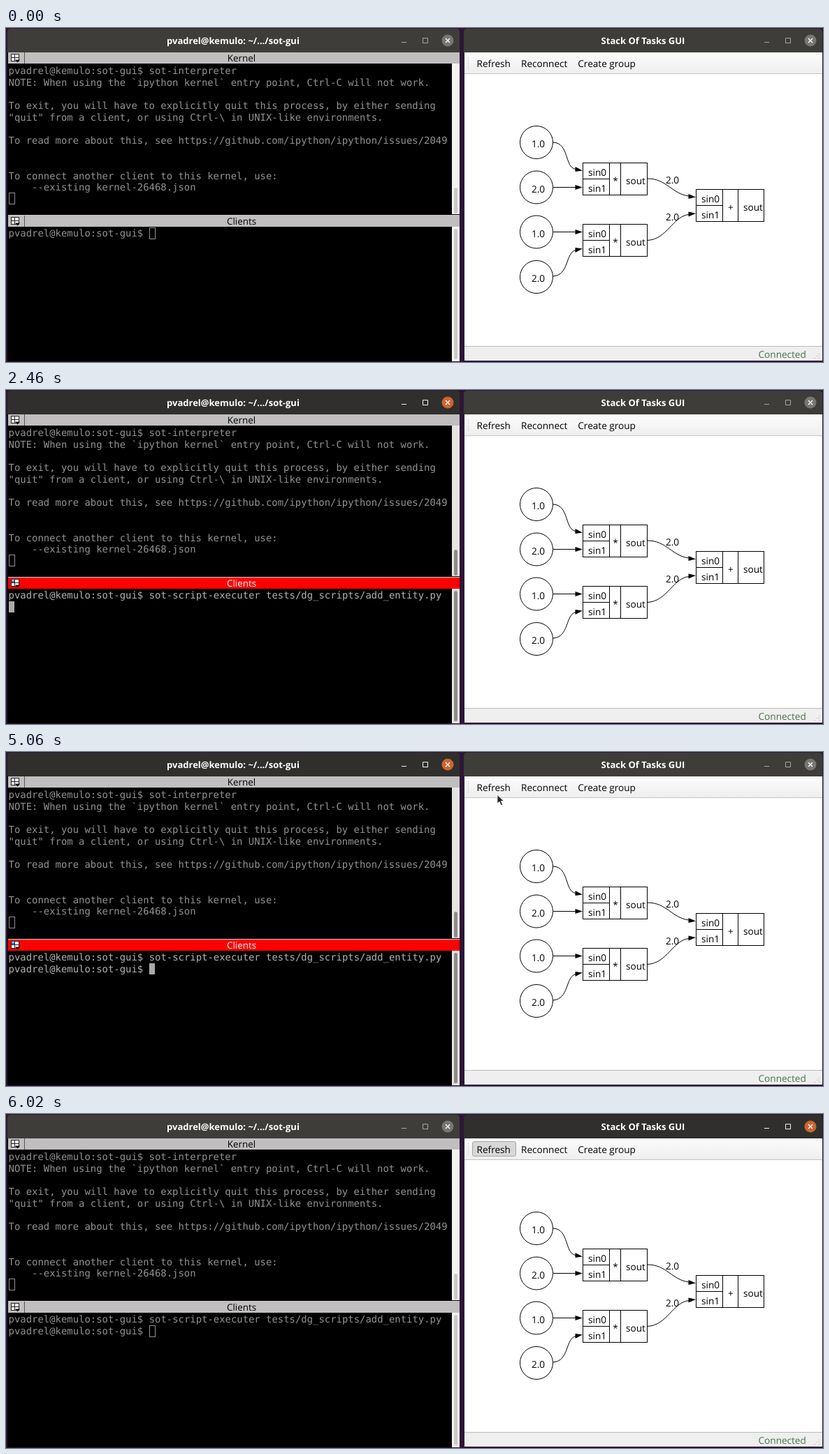
These frames come from a looping animation (1169 px wide and 479 px high, 8000 ms). An HTML page:

```html
<!DOCTYPE html>
<html lang="en">
<head>
<meta charset="utf-8">
<title>Stack Of Tasks GUI</title>
<style>
  html, body { margin: 0; width: 100%; height: 100%; overflow: hidden; background: #2d1636; }
  svg { display: block; width: 1169px; height: 479px; }
  text { white-space: pre; text-rendering: geometricPrecision; font: 500 13.6px "Open Sans", "Noto Sans", sans-serif; }
  .mid { text-anchor: middle; }
  .title { font-weight: 700; font-size: 13px; fill: #fff; text-anchor: middle; }
  .pane { font-size: 13.4px; text-anchor: middle; }
  .term text { font: 13.92px "DejaVu Sans Mono", monospace; fill: #929292; }
  .line { fill: none; stroke: #000; }
  .hollow { fill: none; stroke: #929292; }
  rect, .crisp { shape-rendering: crispEdges; }

  .win { --bar: #3e3d39; --glyph: #a9a8a5; --close: #777672; --track: #f4f3f2; --thumb: #cbc9c7; }
  .win.active { --bar: #302f2e; --glyph: #f4f4f2; --close: #cb6530; --track: #e6e4e2; --thumb: #8d8c8b; }
  .bar { fill: var(--bar); }
  .glyph { fill: none; stroke: var(--glyph); }
  .close { fill: var(--close); }
  .track { fill: var(--track); }
  .thumb { fill: var(--thumb); shape-rendering: auto; }

  .strip { fill: #c0bebf; }
  .active .clients .strip { fill: #f00; }
  .active .clients .pane { fill: #fff; }
  .active .clients .divider { stroke: #d80000; }
  .active .clients .chip { fill: #3f7fd0; }
  .active .clients .term text { fill: #b2b2b2; }
</style>
</head>
<body>
<svg id="stage" viewBox="0 0 1169 479" xmlns="http://www.w3.org/2000/svg"></svg>
<script>
const LOOP = 8000;
const CELL = { w: 8.378, h: 16.75 };
const PROMPT = 'pvadrel@kemulo:sot-gui$ ';
const COMMAND = 'sot-script-executer tests/dg_scripts/add_entity.py';

const rect = (x, y, w, h, attrs) => `<rect x="${x}" y="${y}" width="${w}" height="${h}" ${attrs}/>`;
const text = (x, y, value, cls = '', id = '') => `<text x="${x}" y="${y}" class="${cls}" id="${id}">${value}</text>`;
const path = (d, cls = 'line', attrs = '') => `<path d="${d}" class="${cls}" ${attrs}/>`;
const rows = (top, lines) => lines.map((s, i) => s && text(3.6, top + 13 + i * CELL.h, s)).join('');

function titleBar(x, width, center, closeX, label) {
  return path(`M${x} 35V6q0-5 5-5H${x + width - 5}q5 0 5 5V35z`, 'bar')
    + text(center, 23, label, 'title')
    + path(`M${closeX - 66} 20.5h7M${closeX - 35.5} 14.5h7v7h-7z`, 'glyph')
    + `<circle cx="${closeX}" cy="18" r="8.5" class="close"/>`
    + path(`M${closeX - 3} 15l6 6m0-6l-6 6`, 'line', 'style="stroke:#fff" stroke-width="1.4"');
}

function paneHeader(y, h, label) {
  const mid = y + h - 7.5;
  return rect(3, y, 646, h, 'class="strip"')
    + path(`M26.5 ${y}v${h}`, 'line divider crisp', 'style="stroke-opacity:.55" stroke="#777"')
    + rect(7, mid - 6, 11, 10, 'fill="#fff" stroke="#222"')
    + rect(8, mid - 5, 4, 4, 'class="chip" fill="#ddd"')
    + path(`M12.5 ${mid - 6}v10M7 ${mid - 1}h11`, 'line crisp', 'style="stroke:#222"')
    + path(`M13 ${mid + 2}h7l-3.5 4z`, '', 'fill="#111"')
    + text(337, mid + 4.6, label, 'pane');
}

function scrollbar(y, h, thumbY, thumbH) {
  return rect(638, y, 11, h, 'class="track"')
    + rect(641, thumbY, 5, thumbH, 'rx="2.5" class="thumb"');
}

function terminalWindow() {
  const kernelText = [
    PROMPT + 'sot-interpreter',
    'NOTE: When using the `ipython kernel` entry point, Ctrl-C will not work.',
    '',
    'To exit, you will have to explicitly quit this process, by either sending',
    '"quit" from a client, or using Ctrl-\\ in UNIX-like environments.',
    '',
    'To read more about this, see https://github.com/ipython/ipython/issues/2049',
    '', '',
    'To connect another client to this kernel, use:',
    '    --existing kernel-26468.json'
  ];
  return `<g id="terminal" class="win">`
    + rect(2, 30, 647, 448, 'fill="#000"')
    + titleBar(2, 647, 325, 632, 'pvadrel@kemulo: ~/.../sot-gui')
    + `<g class="kernel">${paneHeader(35, 16, 'Kernel')}${scrollbar(51, 216, 229, 37)}`
    + `<g class="term">${rows(52.8, kernelText)}</g>${rect(4.5, 236.5, 8, 16, 'class="hollow"')}</g>`
    + rect(3, 268, 646, 1, 'fill="#d0cecd"')
    + `<g class="clients">${paneHeader(269, 16, 'Clients')}${scrollbar(285, 193, 288, 187)}`
    + `<g class="term">${rows(286.2, [PROMPT])}`
    + text(3.6 + 24 * CELL.w, 299.2, COMMAND, '', 'command')
    + text(3.6, 315.95, PROMPT, '', 'nextPrompt')
    + `</g>${rect(0, 0, 8, 16, 'id="cursor"')}</g></g>`;
}

function edge(d, x, y, slope = 0) {
  return path(d) + path(`M${x} ${y}l-10.5 ${-3.5 - slope}v7z`, '', 'fill="#000"');
}

function block(x, y, w, opLeft, opRight, symbol) {
  return rect(x + .5, y + .5, w, 46, 'class="line"')
    + path(`M${x} ${y + 23.5}h${opLeft}M${x + opLeft + .5} ${y}v46M${x + opRight + .5} ${y}v46`, 'line crisp')
    + text(x + 8, y + 19.3, 'sin0') + text(x + 8, y + 42.3, 'sin1')
    + text(x + (opLeft + opRight) / 2 + 1, y + 30.5, symbol, 'mid')
    + text(x + opRight + 8, y + 30.5, 'sout');
}

function graph() {
  const inputs = [[164, '1.0'], [228.5, '2.0'], [292.5, '1.0'], [357, '2.0']];
  return inputs.map(([y, v]) =>
      `<circle cx="759" cy="${y}" r="23.5" class="line"/>` + text(761.5, y + 7, v, 'mid')).join('')
    + block(825, 193, 92, 38, 54, '*')
    + block(825, 281, 92, 38, 54, '*')
    + block(987, 231, 97, 38, 60, '+')
    + edge('M783 164C806 165 799 200 815 202.5', 825, 204.5, 2)
    + edge('M783 228.5H815', 825, 228.5)
    + edge('M783 292.5H815', 825, 292.5)
    + edge('M783 356C806 354 800 323 815 318.5', 825, 316.5, -2)
    + edge('M918 216C945 216 953 238 977 241', 987, 242.5, 1)
    + edge('M918 304.5C946 303 954 270 977 267.5', 987, 266, -1)
    + text(953.5, 223, '2.0', 'mid') + text(953.5, 276, '2.0', 'mid');
}

function guiWindow() {
  const dots = Array.from({ length: 6 }, (_, i) => rect(661, 42 + i * 3, 1, 1, 'fill="#aaa"')).join('');
  const grip = [0, 1, 2].map(i => rect(1157 + i * 3, 473 - i * 3, 1, 1, 'fill="#aaa"')
    + rect(1163, 473 - i * 3, 1, 1, 'fill="#aaa"')).join('');
  return `<g id="gui" class="win">`
    + rect(656, 30, 512, 447, 'fill="#fff"')
    + titleBar(655, 513, 911.5, 1151, 'Stack Of Tasks GUI')
    + rect(656, 35, 512, 30, 'fill="url(#toolbar)"')
    + rect(656, 65, 512, 1, 'fill="#c4c4c4"') + dots
    + rect(667.5, 39.5, 62, 21, 'rx="2.5" id="button" style="shape-rendering:auto"')
    + text(673.5, 56, 'Refresh') + text(737, 56, 'Reconnect') + text(818.3, 56, 'Create group')
    + graph()
    + rect(656, 456, 512, 21, 'fill="#efefef"') + rect(656, 456, 512, 1, 'fill="#b9b9b9"')
    + `<g fill="#457345">${text(1076.5, 472.5, 'Connected')}</g>` + grip + `</g>`;
}

const BEAM = 'M-3-7.5h2l1 1 1-1h2M0-6.5v13M-3 7.5h2l1-1 1 1h2';
const stage = document.getElementById('stage');
stage.innerHTML = `<defs><linearGradient id="toolbar" x2="0" y2="1">
    <stop stop-color="#fcfcfc"/><stop offset="1" stop-color="#efefef"/></linearGradient></defs>`
  + rect(0, 0, 1169, 479, 'fill="#2d1636"')
  + terminalWindow() + guiWindow()
  + `<circle id="ring" r="10.5" fill="none" stroke="#3c6ca6" stroke-width="1.4"/>
  <g id="beam">${path(BEAM, 'line', 'style="stroke:#fff" stroke-width="2.6"')}${path(BEAM, 'line', 'style="stroke:#222"')}</g>
  <g id="arrow">${path('M.5.5V13l3-2.8 2.3 5.4 2.2-1-2.2-5.2h4z', '', 'fill="#222" stroke="#eee" stroke-width=".9"')}</g>`;

const part = Object.fromEntries([...stage.querySelectorAll('[id]')].filter(e => e.id).map(e => [e.id, e]));

// Each pointer trip is a list of [ms, x, y].
const TRIPS = [
  [[500, 455, 478], [620, 398, 428], [720, 343, 383], [800, 323, 370], [900, 323, 370],
   [1020, 369, 408], [1070, 369, 408], [1270, 454, 482]],
  [[4430, 600, 478], [4570, 622, 410], [4750, 658, 255], [4920, 693, 105], [5050, 702.5, 61],
   [5150, 702.5, 61], [5310, 701.5, 50], [5750, 701.5, 50], [5860, 701, 160], [6020, 700, 475]]
];
const CLICKS = [[800, 1170, 323, 370], [5550, 5850, 701, 50]];
const BLINK_OFF = [[1810, 2410], [3090, 3660], [4280, 4850]];
const CURSOR = [[0, 24, 0], [970, 74, 0], [2460, 0, 1], [3810, 24, 1]];

const within = t => ([from, to]) => t >= from && t < to;
const show = (el, on) => el.setAttribute('visibility', on ? 'visible' : 'hidden');
const place = (el, x, y) => el.setAttribute('transform', `translate(${x} ${y})`);

function pointerAt(t) {
  const trip = TRIPS.find(p => t >= p[0][0] && t < p[p.length - 1][0]);
  if (!trip) return null;
  const i = trip.findIndex(k => k[0] > t);
  const [t0, x0, y0] = trip[i - 1], [t1, x1, y1] = trip[i];
  const u = (t - t0) / (t1 - t0);
  return [x0 + (x1 - x0) * u, y0 + (y1 - y0) * u];
}

function draw(t) {
  const typing = t >= 800 && t < 5200;
  part.terminal.classList.toggle('active', typing);
  part.gui.classList.toggle('active', t >= 5200);
  show(part.command, t >= 970);
  show(part.nextPrompt, t >= 3810);

  const [, col, row] = CURSOR.filter(k => k[0] <= t).pop();
  const inset = typing ? 0 : .5;
  place(part.cursor, Math.round(4 + col * CELL.w) + inset, 286 + row * 17 + inset);
  part.cursor.setAttribute('class', typing ? '' : 'hollow');
  part.cursor.setAttribute('fill', '#aaa');
  show(part.cursor, !typing || !BLINK_OFF.some(within(t)));

  const pressed = t >= 5600;
  show(part.button, t >= 5230);
  part.button.setAttribute('fill', pressed ? '#d8d8d8' : '#fdfdfd');
  part.button.setAttribute('stroke', pressed ? '#a6a6a6' : '#bdbdbd');

  const click = CLICKS.find(within(t));
  show(part.ring, click);
  if (click) place(part.ring, click[2], click[3]);

  const pos = pointerAt(t);
  const overText = pos && pos[0] < 638;
  show(part.beam, overText);
  show(part.arrow, pos && !overText);
  if (pos) place(overText ? part.beam : part.arrow, ...pos);
}

const start = performance.now();
function tick() {
  draw((performance.now() - start) % LOOP);
  requestAnimationFrame(tick);
}
tick();
</script>
</body>
</html>
```
